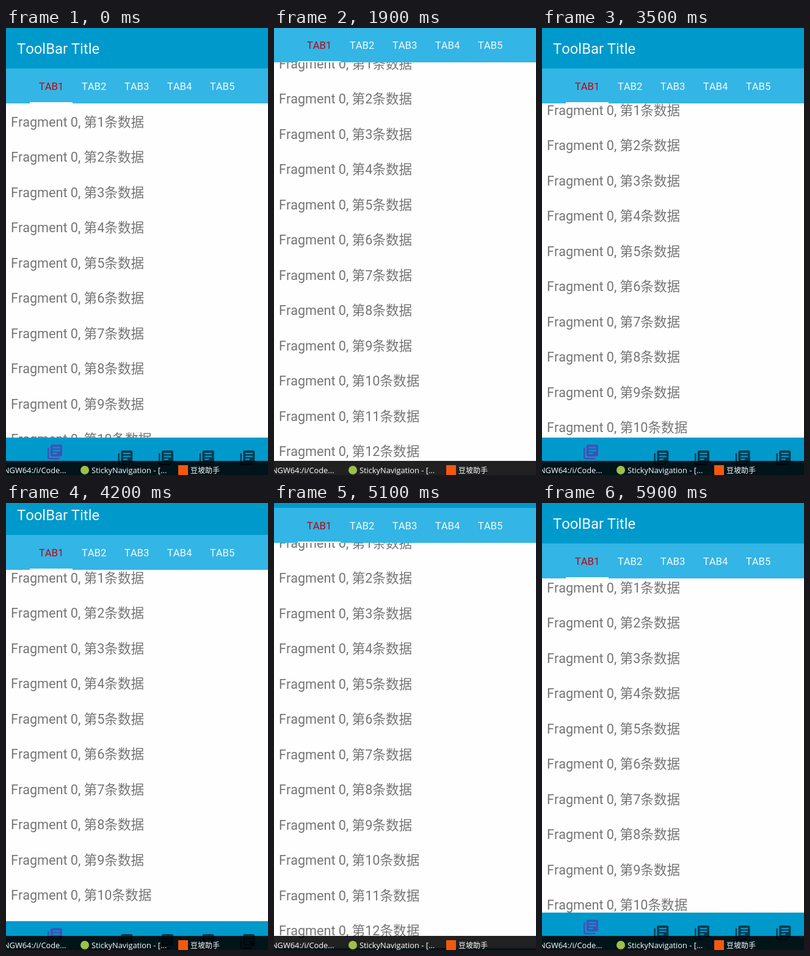
Animation, 429 px wide and 729 px high, one loop 6700 ms. Source, as an HTML page:

```html
<!DOCTYPE html>
<html lang="zh">
<head>
<meta charset="utf-8">
<title>Sticky tabs</title>
<style>
  html, body { margin: 0; width: 100%; height: 100%; overflow: hidden; background: #fefefe; }
  svg { display: block; width: 100%; height: 100%; }
  text { font-family: Roboto, "Noto Sans CJK SC", "Noto Sans CJK", sans-serif; font-kerning: none; white-space: pre; }
  #list text { font-size: 21.6px; fill: #757575; }
  .title { font-size: 23.8px; fill: #f4fafc; }
  .tab { font-size: 16.67px; fill: #f4fafc; text-anchor: middle; }
  .tab.active { fill: #c4000c; }
  #taskbar text { font-family: "Open Sans", "Noto Sans CJK SC", "Noto Sans CJK", sans-serif; font-size: 12.8px; fill: #fff; }
  #taskbar .cjk { font-size: 12px; }
</style>
</head>
<body>
<svg viewBox="0 0 429 729">
  <defs>
    <path id="books" transform="scale(1.19) translate(-12 -12)" fill-rule="evenodd"
      d="M4 6H2v14c0 1.1.9 2 2 2h14v-2H4zM20 2H8c-1.1 0-2 .9-2 2v12c0 1.1.9 2 2 2h12c1.1 0 2-.9 2-2V4c0-1.1-.9-2-2-2zM19 11H9V9h10zM15 15H9v-2h6zM19 7H9V5h10z"/>
  </defs>
  <g id="list"></g>
  <g id="header">
    <rect width="429" height="66" fill="#0099cc"/>
    <rect y="66" width="429" height="57" fill="#33b5e5"/>
    <text class="title" x="18" y="42">ToolBar Title</text>
    <g id="tabs"></g>
    <rect x="39" y="121" width="70" height="2" fill="#fff"/>
  </g>
  <g id="bottom">
    <rect y="668" width="429" height="67" fill="#0099cc"/>
    <use href="#books" transform="translate(80 691.5)" fill="#3f51b5"/>
    <g id="icons" fill="#000" fill-opacity=".62"></g>
  </g>
  <g id="taskbar">
    <rect y="706" width="429" height="23" fill="#000" fill-opacity=".87"/>
    <text x="98.5" y="726" text-anchor="end">MINGW64:/i/Code...</text>
    <circle cx="129" cy="721" r="7" fill="#9dbf4a"/>
    <text x="140" y="726">StickyNavigation - [...</text>
    <rect x="282" y="713" width="16" height="16" fill="#f4580c"/>
    <text class="cjk" x="302" y="726">豆坡助手</text>
  </g>
</svg>
<script>
  const LOOP = 6700, CLOCK = 100, TOOLBAR = 67;

  // Each drag jumps by `first` pixels, then eases out to `travel`.
  const drags = [
    { start: 1510, end: 1910, steps: 3, first: 4, travel: 95, power: 0.1 },
    { start: 3210, end: 3610, steps: 3, first: -21, travel: -78, power: 3.1 },
    { start: 4210, end: 4920, steps: 5, first: 14, travel: 80, power: 1.77 },
    { start: 5110, end: 5900, steps: 5, first: -9, travel: -82, power: 1.28 }
  ];

  const byId = id => document.getElementById(id);
  const fill = (id, count, item) => {
    byId(id).innerHTML = Array.from({ length: count }, (_, i) => item(i)).join("");
  };
  const moveY = (id, y) => byId(id).setAttribute("transform", `translate(0 ${y})`);

  fill("list", 13, i => `<text x="8" y="${160.7 + i * 57.5}">Fragment 0, 第${i + 1}条数据</text>`);
  fill("tabs", 5, i => `<text class="tab${i ? "" : " active"}" x="${74 + i * 70}" y="101.3">TAB${i + 1}</text>`);
  fill("icons", 4, i => `<use href="#books" transform="translate(${195.3 + i * 66.7} 701)"/>`);

  // The drag is seen only at evenly spaced steps, rounded to the clock.
  function dragged({ start, end, steps, first, travel, power }, time) {
    const stepTime = i => Math.round((start + (end - start) * i / steps) / CLOCK) * CLOCK;
    let step = -1;
    while (step < steps && stepTime(step + 1) <= time) step++;
    if (step < 0) return 0;
    const eased = 1 - (1 - step / steps) ** power;
    return Math.round(first + (travel - first) * eased);
  }

  function draw() {
    const time = performance.now() % LOOP;
    let hidden = 0, scroll = 0;
    for (const drag of drags) {
      // The toolbar takes up the movement first; the list scrolls by the rest.
      const wanted = hidden + dragged(drag, time);
      hidden = Math.min(TOOLBAR, Math.max(0, wanted));
      scroll += wanted - hidden;
    }
    moveY("header", -hidden);
    moveY("list", -hidden - scroll);
    moveY("bottom", hidden);
    requestAnimationFrame(draw);
  }
  draw();
</script>
</body>
</html>
```
